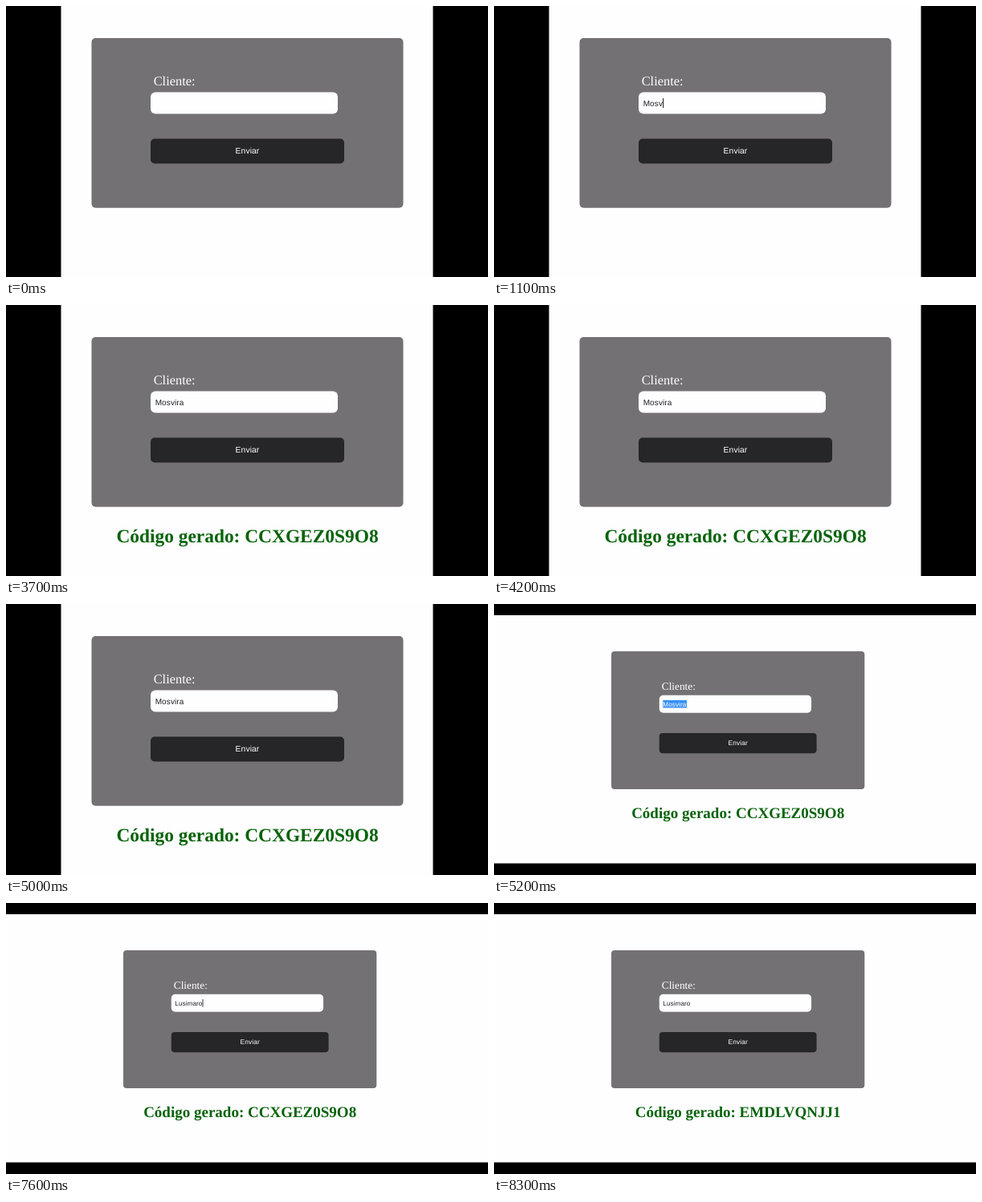
Recreate the animation shown at these times as an HTML page. Size 600 by 338 pixels, loop 9.9 s.

```html
<!DOCTYPE html>
<html lang="pt">
<head>
<meta charset="utf-8">
<title>Gerador de código</title>
<style>
  html, body { margin: 0; width: 100%; height: 100%; overflow: hidden; background: #000; }
  svg { display: block; width: 600px; height: 338px; }
  text { white-space: pre; text-rendering: geometricPrecision; }
  .serif { font-family: "Liberation Serif", "Times New Roman", serif; }
  .sans { font: 10px "Liberation Sans", Arial, sans-serif; letter-spacing: .1px; }
  .label { font-size: 16.4px; fill: #fff; }
  .result { font-size: 23.4px; font-weight: bold; fill: #066308; }
  .button { font-size: 10.3px; fill: #fff; }
  .middle { text-anchor: middle; }
</style>
</head>
<body>
<svg viewBox="0 0 600 338">
  <rect width="600" height="338"/>
  <rect id="page" fill="#fefdff"/>
  <g id="form">
    <rect x="106.5" y="40" width="388" height="211.7" rx="5" fill="#737173"/>
    <text class="serif label" x="183.7" y="99">Cliente:</text>
    <rect x="180" y="107.5" width="233" height="27" rx="6" fill="#fefdff"/>
    <rect id="selection" x="185.6" y="115" width="38" height="11.8" fill="#3790f5"/>
    <text id="name" class="sans" x="185.7" y="124.6"></text>
    <rect id="caret" y="115" width="1" height="12" fill="#111"/>
    <rect x="180" y="165.5" width="241" height="31" rx="5" fill="#262527"/>
    <text class="sans button middle" x="300.5" y="184.4">Enviar</text>
    <text id="result" class="serif result middle" x="300.5" y="296"></text>
  </g>
</svg>
<script>
const LOOP = 9900, BLINK = 500, ZOOM_OUT = 5200;
const el = id => document.getElementById(id);
const [page, form, selection, nameText, caret, result] =
  ['page', 'form', 'selection', 'name', 'caret', 'result'].map(el);

// Each key time adds one more letter.
const entries = [
  { start: 0, word: 'Mosvira', keys: [400, 700, 900, 1000, 1200, 2000, 2200], sent: 3700, code: 'CCXGEZ0S9O8' },
  { start: ZOOM_OUT, word: 'Lusimaro', keys: [6500, 6800, 6900, 7000, 7200, 7300, 7500, 7600], sent: 8000, code: 'EMDLVQNJJ1' }
];

const views = [
  { page: { x: 68.5, y: 0, width: 463, height: 338 }, move: '' },
  { page: { x: 0, y: 14, width: 600, height: 309.5 }, move: 'translate(59.5 26.5) scale(.8125)' }
];

function setAttrs(node, attrs) {
  for (const key in attrs) node.setAttribute(key, attrs[key]);
}

function setText(node, text) {
  if (node.textContent !== text) node.textContent = text;
}

function show(node, visible) {
  node.setAttribute('visibility', visible ? 'visible' : 'hidden');
}

function draw(t) {
  const index = t < ZOOM_OUT ? 0 : 1;
  const { word, keys, sent } = entries[index];
  const count = keys.filter(key => key <= t).length;
  const selected = index === 1 && count === 0;

  setAttrs(page, views[index].page);
  form.setAttribute('transform', views[index].move);

  setText(nameText, selected ? entries[0].word : word.slice(0, count));
  nameText.setAttribute('fill', selected ? '#fff' : '#222');
  show(selection, selected);
  if (selected) selection.setAttribute('width', nameText.getComputedTextLength() + .8);

  const blinkOn = count > 0 && Math.floor((t - keys[count - 1]) / BLINK) % 2 === 0;
  show(caret, blinkOn && t < sent);
  caret.setAttribute('x', 185.9 + (count ? nameText.getComputedTextLength() : 0));

  const last = entries.filter(entry => entry.sent <= t).pop();
  setText(result, last ? 'Código gerado: ' + last.code : '');
}

const origin = performance.now();
function tick() {
  draw((performance.now() - origin) % LOOP);
  requestAnimationFrame(tick);
}
tick();
</script>
</body>
</html>
```
